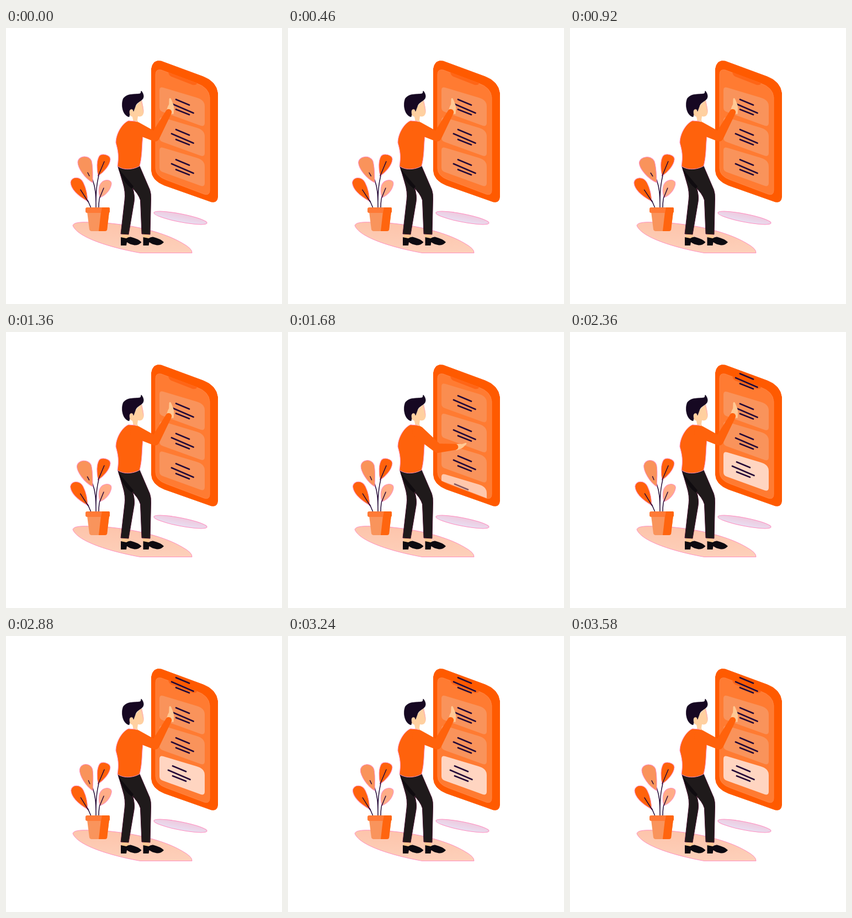
An HTML page for the animation above (3600 ms loop, 500 by 500 pixels).

```html
<!DOCTYPE html>
<html lang="en">
<head>
<meta charset="utf-8">
<title>Swiping cards</title>
<style>
  html, body { margin: 0; width: 100%; height: 100%; overflow: hidden; background: #fff; }
  svg { display: block; width: 100vw; height: 100vh; }
  .halo { stroke: #ff8fc0; stroke-width: 1; }
  .ink { fill: none; stroke: #250b38; stroke-linecap: round; }
</style>
</head>
<body>
<svg viewBox="0 0 500 500">
  <defs>
    <linearGradient id="ground" x2="0" y2="1">
      <stop stop-color="#fdc4ab"/><stop offset="1" stop-color="#fdd0ba"/>
    </linearGradient>
    <linearGradient id="shade" y2="1" x2="0">
      <stop stop-color="#efc9de"/><stop offset="1" stop-color="#e8def1"/>
    </linearGradient>
    <clipPath id="screen"><path d="M264 60H376V307.3L264 264.2Z"/></clipPath>
    <path id="card" d="M278 6Q278-1 285 1L345 19Q360 23 360 35V65Q360 72 353 70L284 45Q278 43 278 37Z"/>
    <path id="lines" class="ink" stroke-width="2.8" d="M308 22.500L332 32.500M300 30L339.500 47M308 40.500L332 50"/>
  </defs>

  <path class="halo" fill="url(#ground)" d="M121 358C123 349 150 352 180 353C240 358 290 372 320 390Q338 400 337 407.500H243C190 398 130 380 121 358Z"/>
  <ellipse class="halo" cx="316" cy="344" rx="49" ry="7.500" transform="rotate(11 316 344)" fill="url(#shade)"/>

  <path fill="#ff5a00" stroke="#ff5a00" d="M263.500 74Q266 57 281 60L357 88Q381 97 383.500 118V306Q383 317 372 315L287 285Q264 276 263.500 258Z"/>
  <path fill="#ff7b32" stroke="#ff8442" d="M271 84Q271 74 281 76L345 100Q368 108 369 126V294Q369 304 359 301L290 275Q271 268 271 254Z"/>
  <path fill="#ff6516" d="M294 80L346 100Q345 104 338 103L302 89Q295 87 294 80Z"/>
  <g clip-path="url(#screen)" id="cards"></g>

  <path class="ink" stroke-width="1.500" d="M163 326C163 300 162 290 157 275M163 326Q162 282 171 258M168 326Q168 308 172 300M154 326L148 312"/>
  <g id="leaves"></g>
  <path fill="#f9945c" d="M147 333H187L183 366Q182 368 179 368H155Q152 368 151 365Z"/>
  <path fill="#ff650f" d="M172 333H187L183 366Q182 368 179 368H168Z"/>
  <path fill="#ff7a36" d="M147 325H186Q188 325 188 328V332Q188 335 185 335H147Q144 335 144 332V328Q144 325 147 325Z"/>
  <path fill="#ff650f" d="M174 325H186Q188 325 188 328V332Q188 335 185 335H172Z"/>

  <path fill="#ffc894" d="M210 371H223V382H209ZM247 371H260V382H249Z"/>
  <path id="shoe" fill="#0d0a10" d="M208 379L218 381Q222 378 226 378.500Q240 382 245.500 388Q241 393.500 233 393.500Q224 392 219 388L218 394H208Z"/>
  <use href="#shoe" x="40.500"/>
  <g fill="#1f1a1b" stroke="#4a1733">
    <path d="M203 251L211.500 280Q217 297 215 312L208 373L222 374L232 315Q234 304 229 288Z"/>
    <path d="M203 251Q222 258 242 250L260.500 293Q263 300 262.500 310L261 374L246 373L243.500 312Q240 300 226 287L205 258Z"/>
  </g>
  <path fill="#100c10" d="M204 255L231 287L228 291Q212 280 204 255Z"/>

  <path fill="#ffd0a0" d="M246 131C248 140 250.500 149 249 155Q247 162 239 160L238 167L241 173H230Q231 167 229 161L224 158Q222 147 228 146Q231 147 231 152Q234 138 246 131Z"/>
  <path fill="#ffb9b0" d="M246 131C248 140 250.500 149 249 155Q248 148 244.500 134Z"/>
  <path fill="#160822" stroke="#160822" stroke-width=".7" d="M223 161C210 158 208 136 213 127C221 118 231 121 243 119Q245 117 245 114C251 121 250 128 245 131C240 135 236 136 234 143L231 151Q230 146 226 147Q222 149 224 157Z"/>
  <path class="halo" fill="#ff620c" d="M222 168C210 173 199 192 199 208C203 222 205 232 202 250C212 258 230 257 242 250C246 235 246 222 247 206L249 184Q244 173 234 169Z"/>
  <path id="hand" fill="#ffc894" d="M-3-6C6-6 10-4 14-2L24-2Q27 0 23 2L14 6Q8 8-3 7Z"/>
  <path id="arm" fill="#ff620c"/>
</svg>
<script>
const LOOP = 3600, STEP = 54;
const $ = id => document.getElementById(id);
const mix = (a, b, u) => a + (b - a) * u;
const ramp = (t, from, to) => Math.min(1, Math.max(0, (t - from) / (to - from)));
const ease = u => (1 - Math.cos(Math.PI * u)) / 2;

// Fourth card is the pale one that arrives from below
$('cards').innerHTML = [107, 161.5, 216, 271].map((y, i) => `<g data-y="${y}">
  <use href="#card" fill="${i < 3 ? '#f9935b' : '#ffd5c1'}"/>
  <use href="#lines"${i < 3 ? '' : ' x="-6" y="-4"'}/></g>`).join('');
const cards = [...$('cards').children];

const leaves = [
  { x: 157, y: 280, turn: 3, stretch: .1, fill: '#f9935b', vein: 'M148 262L151 268',
    d: 'M157 280C142 272 130 253 130 243C131 231 150 229 155 241C158 253 157 265 157 280Z' },
  { x: 167, y: 268, turn: 1, stretch: .03, fill: '#ff620c', vein: 'M178 242L167 268',
    d: 'M167 268C164 255 164 240 169 232C174 226 189 230 189 238C188 250 176 262 167 268Z' },
  { x: 148, y: 314, turn: .8, stretch: .02, fill: '#ff620c', vein: 'M135 293L149 315',
    d: 'M148 314C134 306 118 294 117 280C118 269 134 268 140 280C146 292 147 302 148 314Z' },
  { x: 170, y: 307, turn: .5, stretch: 0, fill: '#ffac87', vein: 'M177 290L170 307',
    d: 'M170 307C167 295 167 284 175 278C183 273 192 276 191 283C189 294 180 304 170 307Z' }
];
$('leaves').innerHTML = leaves.map(l => `<g><path class="halo" d="${l.d}" fill="${l.fill}"/>
  <path class="ink" stroke-width="1.5" d="${l.vein}"/></g>`).join('');

function sway(t) {
  if (t < 900) return -ease(t / 900);
  if (t < 2000) return mix(-1, .8, ease((t - 900) / 1100));
  return .8 * (1 - ease(ramp(t, 2700, LOOP)));
}

// Tapered limb with round ends
function limb(x1, y1, r1, x2, y2, r2) {
  const a = Math.atan2(y2 - y1, x2 - x1), nx = -Math.sin(a), ny = Math.cos(a);
  return `M${x1 + nx * r1} ${y1 + ny * r1}A${r1} ${r1} 0 0 1 ${x1 - nx * r1} ${y1 - ny * r1}` +
    `L${x2 - nx * r2} ${y2 - ny * r2}A${r2} ${r2} 0 0 1 ${x2 + nx * r2} ${y2 + ny * r2}Z`;
}

function drawArm(down) {
  const ex = mix(270, 271, down), ey = mix(197, 210.5, down);
  const angle = mix(-61, -4, down) * Math.PI / 180, reach = mix(51, 32, down);
  const wx = ex + reach * Math.cos(angle), wy = ey + reach * Math.sin(angle);
  $('arm').setAttribute('d', limb(236, 181, 11, ex, ey, 8.5) + limb(ex, ey, 8.5, wx, wy, 5.5));
  $('hand').setAttribute('transform',
    `translate(${wx + 2} ${wy}) rotate(${mix(-88, -19, down)}) scale(${mix(1, .78, down)})`);
}

function draw(now) {
  const t = now % LOOP;
  const scroll = ramp(t, 1625, 1840);
  cards.forEach((card, i) => {
    card.setAttribute('transform', `translate(0 ${card.dataset.y - STEP * scroll})`);
  });
  cards[0].firstElementChild.setAttribute('opacity', 1 - scroll);
  cards[3].setAttribute('opacity', ramp(t, 1560, 1700));
  cards[3].lastElementChild.setAttribute('opacity', ramp(t, 1580, 1740));

  drawArm(ease(ramp(t, 1400, 1640)) - ease(ramp(t, 1680, 1860)));

  const k = sway(t);
  leaves.forEach((l, i) => $('leaves').children[i].setAttribute('transform',
    `translate(${l.x} ${l.y}) rotate(${k * l.turn}) scale(${1 - k * l.stretch} 1) translate(${-l.x} ${-l.y})`));
  requestAnimationFrame(() => draw(performance.now()));
}
draw(performance.now());
</script>
</body>
</html>
```
